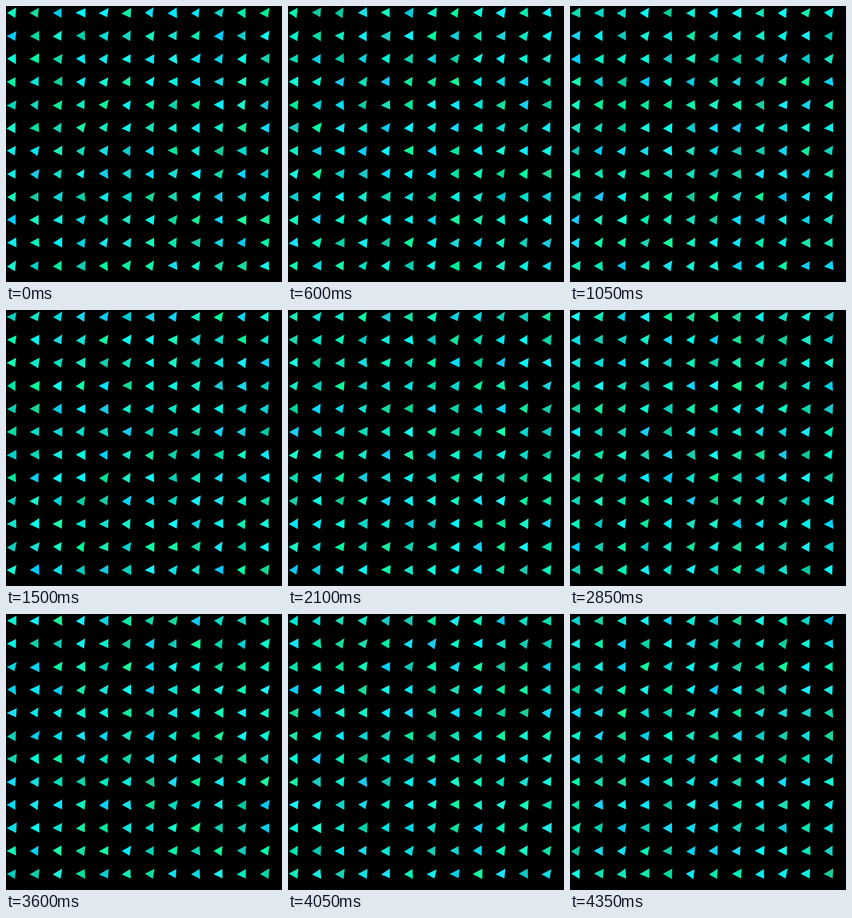
Animation, 384 px wide and 384 px high, one loop 4.5 s. Source, as an HTML page with a canvas:

```html
<!DOCTYPE html>
<html lang="en">
<head>
<meta charset="utf-8">
<title>Flickering triangles</title>
<style>
  html, body { margin: 0; width: 100%; height: 100%; overflow: hidden; background: #000; }
  canvas { display: block; width: 100vw; height: 100vh; }
</style>
</head>
<body>
<canvas id="stage" width="384" height="384"></canvas>
<script>
const SIZE = 384, CELL = 32, COUNT = 12;
const STEP = 150, STEPS = 30;
const ctx = document.getElementById('stage').getContext('2d');

function seeded(seed) {
  let s = seed >>> 0;
  return (lo, hi) => {
    s = (s + 0x6D2B79F5) >>> 0;
    let t = Math.imul(s ^ (s >>> 15), s | 1);
    t ^= t + Math.imul(t ^ (t >>> 7), t | 61);
    return lo + ((t ^ (t >>> 14)) >>> 0) / 4294967296 * (hi - lo);
  };
}

// Each corner is loosely placed, always pointing left.
function triangle(x, y, rnd) {
  const r = Math.floor(rnd(0, 30));
  const g = Math.floor(rnd(200, 256));
  const b = Math.floor(rnd(150, 256));
  ctx.fillStyle = `rgb(${r}, ${g}, ${b})`;
  ctx.beginPath();
  ctx.moveTo(x + rnd(0.6, 1.6), y + rnd(9, 10.6));
  ctx.lineTo(x + rnd(13, 15), y + rnd(1.8, 3.2));
  ctx.lineTo(x + rnd(11.6, 14.6), y + rnd(15.4, 17));
  ctx.fill();
}

function draw(step) {
  const rnd = seeded(7919 * (step + 1));
  ctx.fillStyle = '#000';
  ctx.fillRect(0, 0, SIZE, SIZE);
  for (let row = 0; row < COUNT; row++) {
    for (let col = 0; col < COUNT; col++) triangle(col * CELL, row * CELL, rnd);
  }
}

let shown = -1;
function tick() {
  const step = Math.floor(performance.now() / STEP) % STEPS;
  if (step !== shown) draw(shown = step);
  requestAnimationFrame(tick);
}
tick();
</script>
</body>
</html>
```
